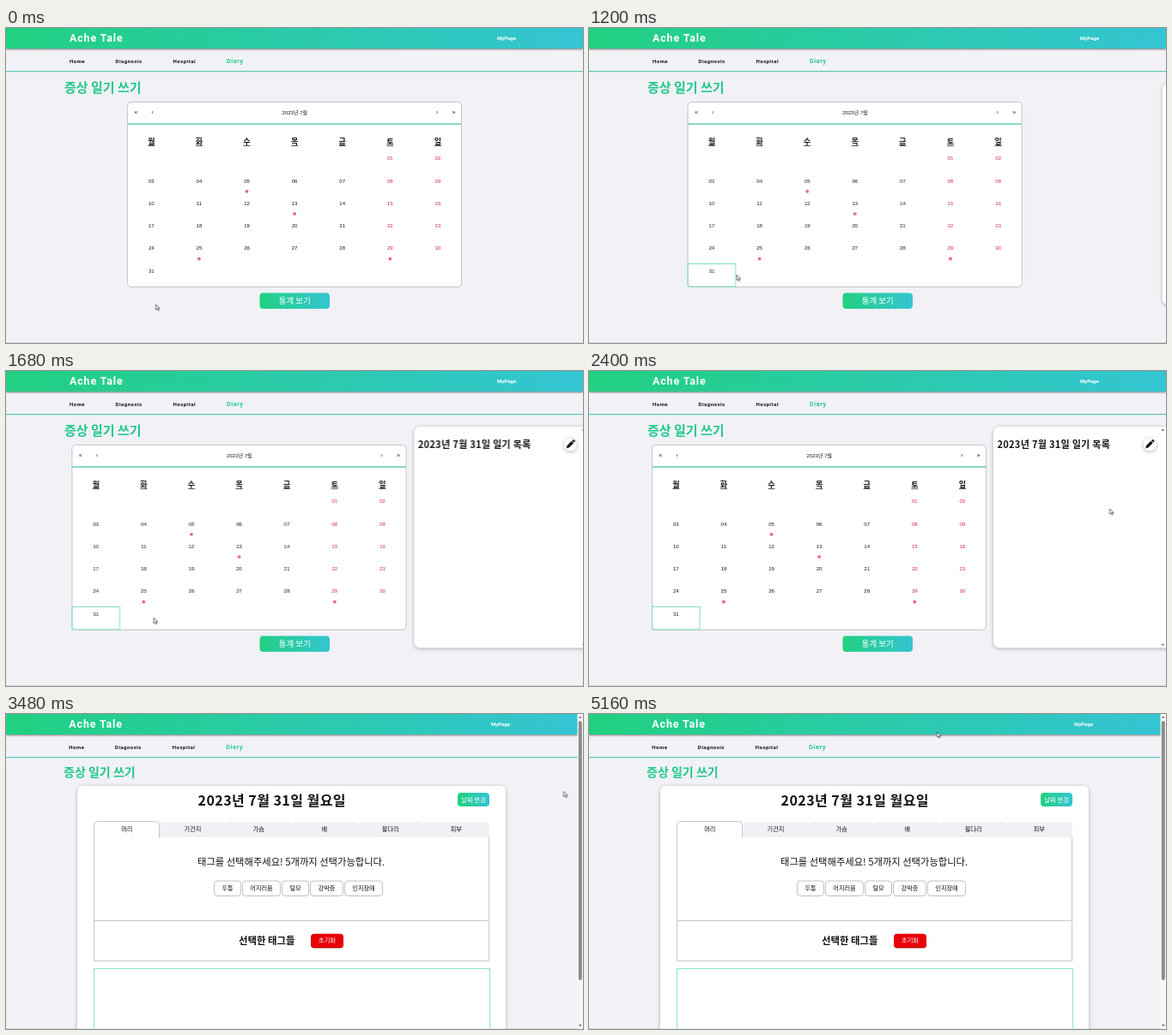
Recreate the animation shown at these times as an HTML page. Size 672 px wide and 368 px high, loop 5.28 s.

```html
<!DOCTYPE html>
<html>
<head>
<meta charset="utf-8">
<title>Symptom diary</title>
<style>
html, body { margin: 0; width: 100%; height: 100%; overflow: hidden; background: #f1f1f6; }
svg { display: block; width: 672px; height: 368px; }
text { font-family: "Noto Sans CJK KR", "Noto Sans CJK", sans-serif; fill: #111; white-space: pre; }
.num { font-family: "Liberation Sans", "Noto Sans CJK KR", sans-serif; }
.ui { font-family: Roboto, sans-serif; font-weight: 700; }
.b { font-weight: 700; }
.mid { text-anchor: middle; }
.white { fill: #fff; }
.green { fill: #1fc98a; }
.red { fill: #cf1f38; }
.line { fill: none; stroke: #c6c9cb; }
.bar { filter: drop-shadow(0 1px 1px rgba(0, 0, 0, .5)); }
.card { fill: #fff; filter: drop-shadow(0 1px 2px rgba(0, 0, 0, .3)); }

#list, #write, #cal, #panel, #cell, #cursor, #arrow, #hand { animation: 5.28s infinite both; }
#list { animation-name: list; animation-timing-function: step-end; }
#write { animation-name: write; animation-timing-function: step-end; }
#cell { animation-name: cell; animation-timing-function: step-end; }
#arrow { animation-name: arrow; animation-timing-function: step-end; }
#hand { animation-name: hand; animation-timing-function: step-end; }
#cal { animation-name: cal; }
#panel { animation-name: panel; }
#cursor { animation-name: cursor; animation-timing-function: ease-in-out; }

@keyframes list { 0% { visibility: visible } 61.3%, 100% { visibility: hidden } }
@keyframes write { 0% { visibility: hidden } 61.3%, 100% { visibility: visible } }
@keyframes cell { 0% { opacity: 0 } 4.5%, 100% { opacity: 1 } }
@keyframes arrow {
  0% { opacity: 1 } 4.5% { opacity: 0 } 22.3% { opacity: 1 }
  53% { opacity: 0 } 61.3%, 100% { opacity: 1 }
}
@keyframes hand {
  0% { opacity: 0 } 4.5% { opacity: 1 } 22.3% { opacity: 0 }
  53% { opacity: 1 } 61.3%, 100% { opacity: 0 }
}
@keyframes cal {
  0%, 18.18% { transform: translateX(141px); animation-timing-function: ease }
  37.12%, 100% { transform: translateX(73px) }
}
@keyframes panel {
  0%, 18.94% { transform: translateX(805px); animation-timing-function: ease }
  34.09%, 100% { transform: translateX(471px) }
}
@keyframes cursor {
  0%, 1.14% { transform: translate(174.5px, 323px) }
  6.8%, 34.09% { transform: translate(172px, 288.5px) }
  45.4%, 47.73% { transform: translate(606.5px, 161px) }
  54.5%, 89.77% { transform: translate(649.5px, 90.5px) }
  97.7%, 100% { transform: translate(405.5px, 21px) }
}
</style>
</head>
<body>
<svg id="stage" viewBox="0 0 672 368"></svg>
<script>
// Text placed by its vertical centre.
const txt = (s, x, cy, size, cls = "", gap = 0) =>
  `<text x="${x}" y="${cy + size * .37}" font-size="${size}" class="${cls}"` +
  `${gap ? ` letter-spacing="${gap}"` : ""}>${s}</text>`;
const box = (x, y, w, h, r, attrs) =>
  `<rect x="${x}" y="${y}" width="${w}" height="${h}" rx="${r}" ${attrs}/>`;
const button = (s, x, y, w, h, size, fill) =>
  box(x, y, w, h, 4, `fill="${fill}"`) + txt(s, x + w / 2, y + h / 2, size, "mid white");
const tri = (x, y, d, r = 2) =>
  `<path d="M${x - r} ${y + d}h${2 * r}l${-r} ${-2 * d}z" fill="#777"/>`;

function header(w, dx, pageX) {
  return box(0, 0, w, 368, 0, 'fill="#f1f1f6"') +
    box(0, 50, w, 1.2, 0, 'fill="#5cc9b5"') +
    box(0, 0, w, 24, 0, 'fill="url(#brand)" class="bar"') +
    txt("Ache Tale", 74 + dx, 11.5, 12.4, "ui white", .9) +
    txt("MyPage", pageX, 12, 6, "ui white") +
    txt("Home", 74 + dx, 38.7, 6, "ui", .5) +
    txt("Diagnosis", 127.5 + dx, 38.7, 6, "ui", .5) +
    txt("Hospital", 194.5 + dx, 38.7, 6, "ui", .5) +
    txt("Diary", 257 + dx, 38.7, 7, "ui green", .7) +
    box(0, 367, w, 1, 0, 'fill="#d6d7da"');
}

function calendar() {
  const colX = i => 28.3 + 55.6 * i;
  const rowY = i => 152 + 26.3 * i;
  const marked = [5, 13, 25, 29];
  let out = box(.5, 86.5, 389, 216, 4, 'fill="#fff" stroke="#c3c6c8"') +
    box(1, 111.2, 388, 1.8, 0, 'fill="#7ad8b8"') +
    txt("2023년 7월", 195.3, 99, 6, "num mid");
  [["«", 10.3], ["‹", 29.5], ["›", 361], ["»", 380.5]]
    .forEach(([s, x]) => out += txt(s, x, 98.5, 6.5, "num mid"));
  [..."월화수목금토일"].forEach((s, i) => {
    out += txt(s, colX(i), 132.7, 9, "b mid") +
      box(colX(i) - 4, 137.3, 8, .8, 0, 'fill="#222"');
  });
  for (let d = 1; d <= 31; d++) {
    const col = (d + 4) % 7, row = Math.floor((d + 4) / 7);
    const x = colX(col), y = rowY(row);
    out += txt(String(d).padStart(2, "0"), x, y, 6, "num mid" + (col > 4 ? " red" : ""));
    if (marked.includes(d)) out += `<circle cx="${x}" cy="${y + 12.5}" r="1.9" fill="#ee6379"/>`;
  }
  return out + box(.5, 275.5, 55.5, 26.5, 0, 'id="cell" fill="none" stroke="#80dcc3"');
}

function panel() {
  return box(0, 65, 230, 258.5, 7, 'class="card"') +
    txt("2023년 7월 31일 일기 목록", 4.5, 85.8, 11, "b", .3) +
    '<circle cx="182" cy="86" r="7.5" class="card"/>' +
    '<g transform="translate(182 85.5) rotate(45)">' +
    '<path d="M-1.7-3.6h3.4v7.6L0 6.6-1.7 4zM-1.7-4.4v-1.4q0-.8.8-.8h1.8q.8 0 .8.8v1.4z" fill="#111"/></g>' +
    tri(197.3, 68.5, 1.2) + tri(197.3, 320, -1.2);
}

function writePage() {
  let out = header(666, -.7, 565) + txt("증상 일기 쓰기", 67, 67.5, 14, "b green") +
    box(83, 84, 499, 300, 6, 'class="card"') +
    txt("2023년 7월 31일 월요일", 223.5, 100.8, 16, "b", .45) +
    button("날짜 변경", 526, 92, 37, 16, 7.3, "url(#brand)");
  ["머리", "기관지", "가슴", "배", "팔다리", "피부"].forEach((s, i) => {
    const x = 102.5 + 76.7 * i;
    if (i) out += `<path d="M${x} 144v-14q0-4 4-4h68.7q4 0 4 4v14z" fill="#eff1f5"/>`;
    out += txt(s, x + 38.3, 134.5, 7.2, "mid");
  });
  out += '<path class="line" d="M102.5 144.5v-15q0-4 4-4h68q4 0 4 4v15"/>' +
    '<path class="line" d="M178.5 144.5M102.5 144v144.5h460V144M102.5 241.5h460"/>' +
    txt("태그를 선택해주세요! 5개까지 선택가능합니다.", 223, 172.8, 11.3);
  [["두통", 242.5, 31], ["어지러움", 275.5, 44], ["탈모", 321.5, 31],
   ["강박증", 354.5, 38], ["인지장애", 394.5, 44]].forEach(([s, x, w]) => {
    out += box(x, 195, w, 17.5, 3.5, 'fill="#fff" stroke="#bfc2c4"') +
      txt(s, x + w / 2, 203.5, 7.2, "mid");
  });
  return out + txt("선택한 태그들", 271, 265, 11.4, "b") +
    box(355, 257.5, 38, 16, 4, 'fill="#a80008"') +
    button("초기화", 355, 256.7, 38, 15.8, 7.2, "#e80008") +
    box(102.5, 297.5, 461, 90, 0, 'fill="#fff" stroke="#8ce6cc"') +
    box(0, 367, 666, 1, 0, 'fill="#d6d7da" opacity=".6"') +
    box(665.5, 0, 6.5, 368, 0, 'fill="#f7f7f8"') +
    box(666.8, 8, 4, 303, 2, 'fill="#8b8b8b"') +
    tri(668.8, 3.5, 1.2) + tri(668.8, 364, -1.2);
}

const cursor =
  '<path id="arrow" d="M0 0v6.2l1.5-1.3 1.1 2.3 1-.5-1-2.2h2z" fill="#fff" stroke="#333" stroke-width=".7"/>' +
  '<path id="hand" d="M-1 .6q.8-1 1.5 0V3l3 .7q1 .3.8 1.4l-.6 2.9H-.4L-2.6 5q.3-1 1.6 0z" ' +
  'fill="#fff" stroke="#222" stroke-width=".7" stroke-linejoin="round"/>';

document.getElementById("stage").innerHTML =
  '<defs><linearGradient id="brand"><stop stop-color="#21d080"/>' +
  '<stop offset="1" stop-color="#34c5d3"/></linearGradient></defs>' +
  `<g id="list">${header(672, 0, 572)}${txt("증상 일기 쓰기", 68, 69, 15, "b green")}` +
  `<g id="cal">${calendar()}</g>` +
  button("통계 보기", 295.5, 309.5, 81.5, 18.5, 9.5, "url(#brand)") +
  `<g id="panel">${panel()}</g></g>` +
  `<g id="write">${writePage()}</g><g id="cursor">${cursor}</g>`;
</script>
</body>
</html>
```
